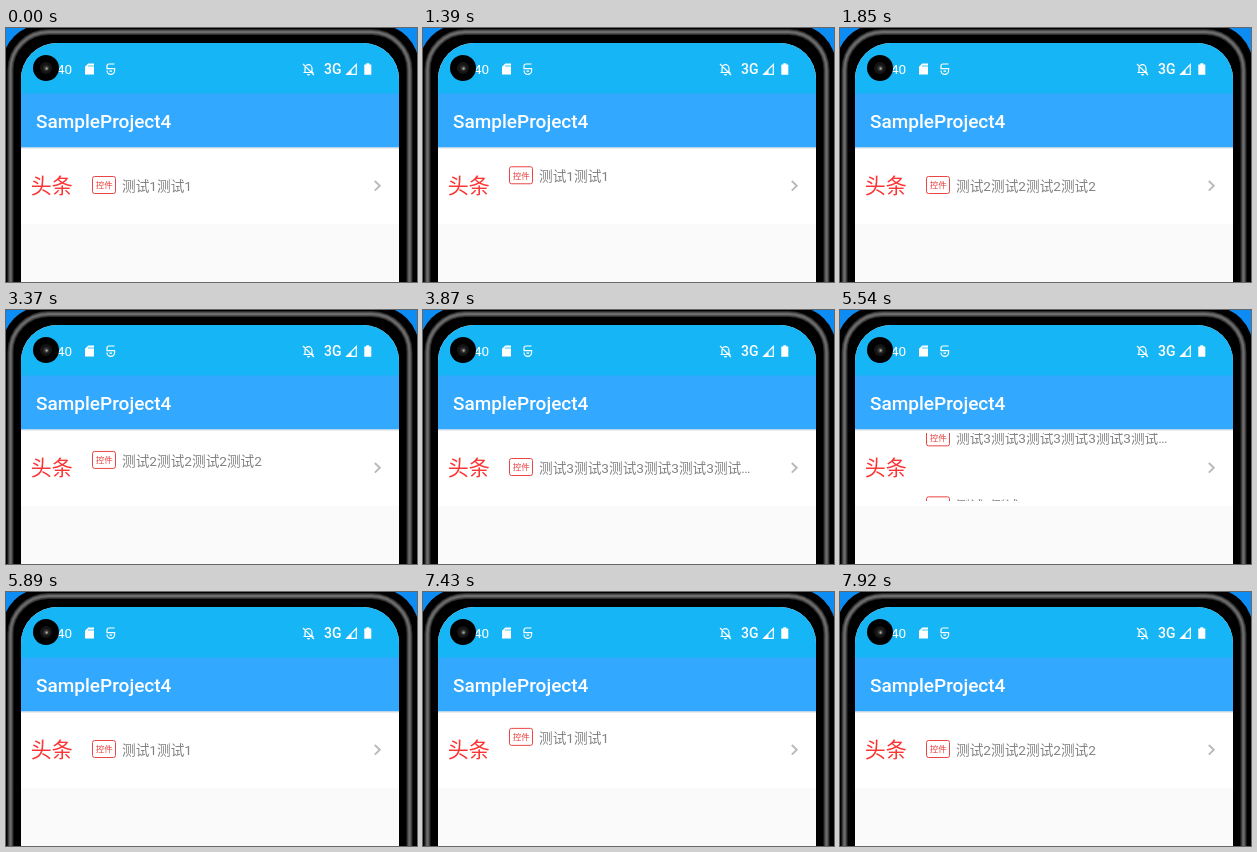
An HTML page that plays this animation: 411x254 px, repeating every 8.65 s.

```html
<!DOCTYPE html>
<html lang="zh-CN">
<head>
<meta charset="utf-8">
<style>
html, body { margin: 0; width: 100%; height: 100%; overflow: hidden; background: #0d8cf4; }
svg { display: block; width: 411px; height: 254px; font-family: Roboto, "Noto Sans CJK SC", "Noto Sans CJK", sans-serif; }
</style>
</head>
<body>
<svg viewBox="0 0 411 254">
  <defs>
    <clipPath id="screen"><rect x="15" y="15" width="378" height="300" rx="36"/></clipPath>
    <clipPath id="banner"><rect x="80" y="123" width="260" height="68"/></clipPath>
    <linearGradient id="shade" x2="0" y2="1">
      <stop stop-color="#d4d9de"/><stop offset="1" stop-color="#fff"/>
    </linearGradient>
  </defs>

  <!-- phone body with its metal rim -->
  <rect x="-4" y="-4" width="417" height="400" rx="42"/>
  <g fill="none">
    <rect x="4.5" y="4" width="399" height="400" rx="38" stroke="#2c2c2c" stroke-width="6"/>
    <rect x="4.5" y="4" width="399" height="400" rx="38" stroke="#4c4c4c" stroke-width="4"/>
    <rect x="4.5" y="4" width="399" height="400" rx="38" stroke="#6c6c6c" stroke-width="2"/>
  </g>

  <g clip-path="url(#screen)">
    <rect width="411" height="254" fill="#fafafa"/>
    <rect y="15" width="411" height="52" fill="#16b6f6"/>
    <rect y="65.5" width="411" height="54.5" fill="#33a8ff"/>
    <rect y="119.5" width="411" height="76.5" fill="#fff"/>
    <rect y="119.5" width="411" height="2" fill="url(#shade)"/>
  </g>

  <!-- status bar -->
  <g fill="#fff">
    <text x="51" y="46" font-size="13.5">40</text>
    <path d="M82.3 35.5H88V46.5H79V38.8Z"/>
    <path d="M83 37v2M85 37v2M87 37v2" stroke="#16b6f6" stroke-width=".8"/>
    <g fill="none" stroke="#fff" stroke-width="1.2">
      <path d="M108.5 36h-5.5a2 2 0 0 0-2 2v2.6h7.6v2a3.8 3.8 0 0 1-7.6 0M103.5 43.2h2.6"/>
      <path d="M299 44.5v-4a3.5 3.8 0 0 1 7 0v4M297.5 44.5h10M297 36l11 11"/>
      <path d="M350.3 36.5v9.8h-9.6z"/>
    </g>
    <path d="M301 46h3a1.5 1.5 0 0 1-3 0zM345.5 41.5v5h-5.5z"/>
    <text x="318" y="46" font-size="14" font-weight="500">3G</text>
    <path d="M360.3 35.3h3v1.2h2v10.2h-7v-10.2h2z"/>
    <text x="30" y="100" font-size="19" font-weight="500">SampleProject4</text>
  </g>

  <!-- camera -->
  <circle cx="40" cy="40" r="13"/>
  <circle cx="40" cy="40" r="6" fill="#151515"/>
  <circle cx="40.3" cy="40.2" r="3" fill="#333"/>
  <circle cx="40.6" cy="40.5" r="1.2" fill="#a5a59c"/>

  <!-- row -->
  <text x="24.8" y="165" font-size="21" fill="#fb3434">头条</text>
  <path d="M368.8 153l5 4.8-5 4.8" fill="none" stroke="#b9b9b9" stroke-width="1.9"/>
  <g clip-path="url(#banner)"><g id="old"></g><g id="next"></g></g>
</svg>
<script>
const LOOP = 8650, SLIDE = 500, HEIGHT = 68;
const labels = ["测试1".repeat(2), "测试2".repeat(4), "测试3".repeat(5) + "测试…"];
// each slide: first and last visible step, number of steps, moment it begins
const slides = [
  [1310, 1850, 9, 1306],
  [3370, 3870, 8, 3318],
  [5330, 5890, 9, 5322],
  [7350, 7920, 9, 7332]
];
const oldItem = document.getElementById("old");
const nextItem = document.getElementById("next");

for (const item of [oldItem, nextItem]) {
  item.innerHTML = `
    <rect x="86.5" y="148.5" width="23" height="17" rx="2" fill="none" stroke="#ea4545"/>
    <text x="89.7" y="160.3" font-size="8.5" fill="#ea4040">控件</text>
    <text class="label" x="116" y="163" font-size="13.67" fill="#828282"></text>`;
}

function place(item, index, y) {
  item.querySelector(".label").textContent = labels[index % labels.length];
  item.setAttribute("transform", `translate(0 ${y})`);
}

function draw(t) {
  let index = 0, p = 0;
  slides.forEach(([first, last, steps, begin], i) => {
    if (t < first) return;
    const step = (last - first) / (steps - 1);
    const n = Math.min(steps - 1, Math.floor((t - first) / step + 1e-6));
    index = i;
    p = n === steps - 1 ? 1 : Math.min(1, (n * step + first - begin) / SLIDE);
  });
  place(oldItem, index, -p * HEIGHT);
  place(nextItem, index + 1, (1 - p) * HEIGHT);
}

const start = performance.now();
function tick() {
  draw((performance.now() - start) % LOOP);
  requestAnimationFrame(tick);
}
tick();
</script>
</body>
</html>
```
